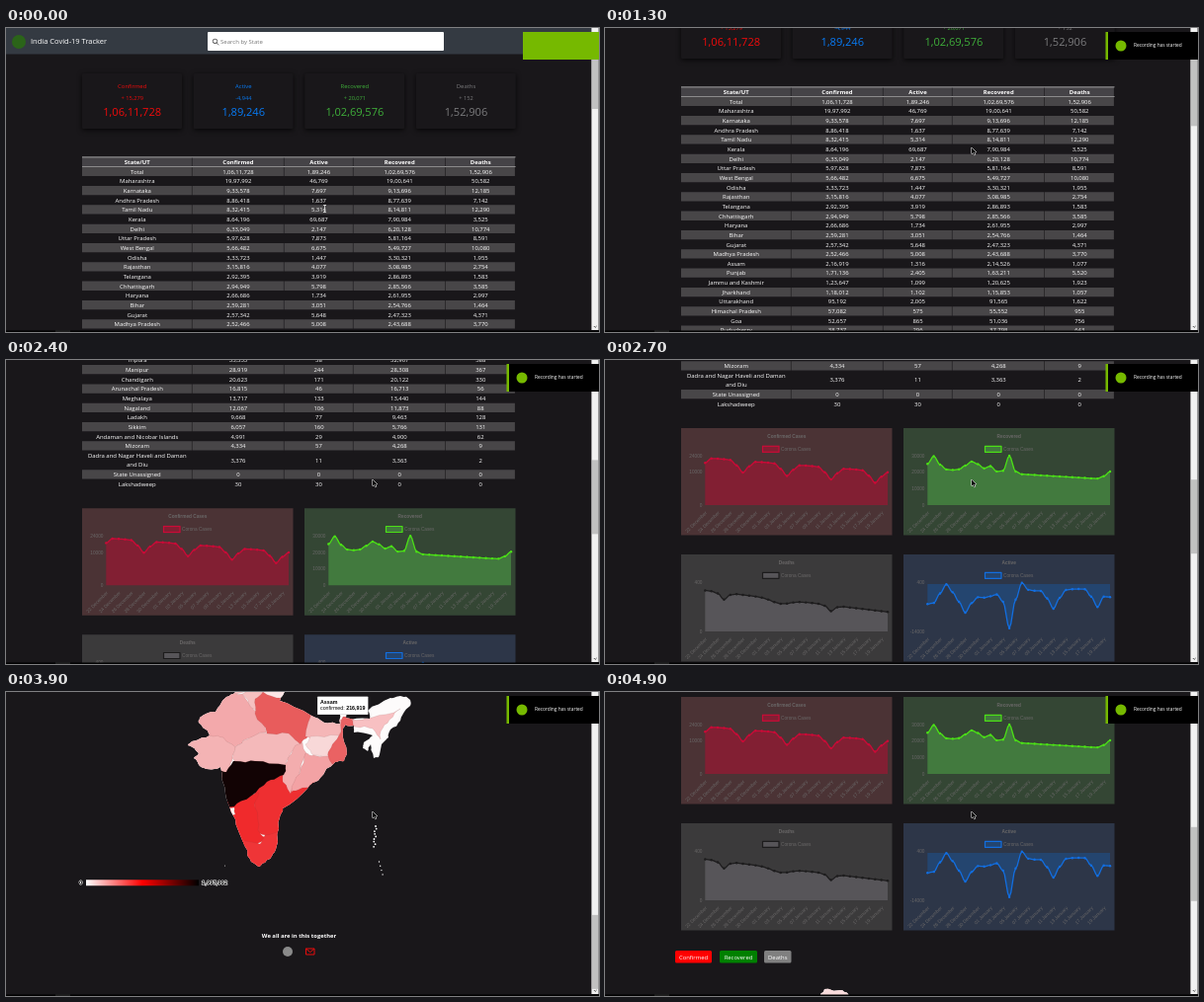
Recreate the animation shown at these times as an HTML page with a canvas. Size 600 by 308 pixels, loop 5000 ms.

```html
<!DOCTYPE html>
<html lang="en">
<head>
<meta charset="utf-8">
<title>Tracker</title>
<style>
html, body { margin: 0; width: 100%; height: 100%; overflow: hidden; background: #19171a; }
canvas { display: block; width: 600px; height: 308px; }
</style>
</head>
<body>
<canvas id="stage"></canvas>
<script>
const stage = document.getElementById('stage');
const dpr = window.devicePixelRatio || 1;
stage.width = 600 * dpr;
stage.height = 308 * dpr;
const c = stage.getContext('2d');
const SANS = '"Open Sans", "Noto Sans", sans-serif';
const ARIAL = '"Liberation Sans", Arial, sans-serif';
const BG = '#19171a';

// Confirmed, recovered, deaths; active is the remainder.
const rows = `Total 10611728 10269576 152906
Maharashtra 1997992 1900641 50582
Karnataka 933578 913696 12185
Andhra Pradesh 886418 877639 7142
Tamil Nadu 832415 814811 12290
Kerala 864196 790984 3525
Delhi 633049 620128 10774
Uttar Pradesh 597628 581164 8591
West Bengal 566482 549727 10080
Odisha 333723 330321 1955
Rajasthan 315816 308985 2754
Telangana 292395 286893 1583
Chhattisgarh 294949 285566 3585
Haryana 266686 261955 2997
Bihar 259281 254766 1464
Gujarat 257342 247323 4371
Madhya Pradesh 252466 243688 3770
Assam 216919 214526 1077
Punjab 171136 163211 5520
Jammu and Kashmir 123647 120625 1923
Jharkhand 118012 115853 1057
Uttarakhand 95192 91565 1622
Himachal Pradesh 57082 55552 955
Goa 52657 51036 756
Puducherry 38737 37798 643
Tripura 33333 32907 388
Manipur 28919 28308 367
Chandigarh 20623 20122 330
Arunachal Pradesh 16815 16713 56
Meghalaya 13717 13440 144
Nagaland 12067 11873 88
Ladakh 9668 9463 128
Sikkim 6057 5766 131
Andaman and Nicobar Islands 4991 4900 62
Mizoram 4334 4268 9
Dadra and Nagar Haveli and Daman/and Diu 3376 3363 2
State Unassigned 0 0 0
Lakshadweep 30 0 0`.split('\n').map(line => {
  const [, name, ...n] = line.match(/^(.+) (\d+) (\d+) (\d+)$/);
  const [conf, rec, dead] = n.map(Number);
  return [name, ...[conf, conf - rec - dead, rec, dead].map(v => v.toLocaleString('en-IN'))];
});

function text(s, x, y, size, color, align = 'center', weight = 400, family = SANS) {
  c.font = `${weight} ${size}px ${family}`;
  c.textAlign = align;
  c.fillStyle = color;
  c.fillText(s, x, y + size * 0.35);
}

function box(x, y, w, h, color, r = 0) {
  c.fillStyle = color;
  c.beginPath();
  c.roundRect(x, y, w, h, r);
  c.fill();
}

function dot(x, y, r, color) {
  c.fillStyle = color;
  c.beginPath();
  c.arc(x, y, r, 0, 7);
  c.fill();
}

// Open polyline through the points of a string like "1,2 3,4".
const pairs = s => s.split(' ').map(p => p.split(',').map(Number));
function line(points, color, width) {
  c.beginPath();
  pairs(points).forEach(p => c.lineTo(...p));
  c.strokeStyle = color;
  c.lineWidth = width;
  c.stroke();
}

function header() {
  box(0, 0, 600, 26.5, '#343a42');
  dot(13, 14, 7, '#2b6419');
  text('India Covid-19 Tracker', 25, 13.3, 7.5, '#fff', 'left');
  box(204, 4, 239, 19, '#fff', 1);
  dot(211.5, 13.3, 2.6, '#555');
  dot(211.5, 13.3, 1.8, '#fff');
  line('213.2,15 215.3,17.3', '#555', 0.8);
  text('Search by State', 217, 14, 6, '#757575', 'left');
}

function cards() {
  const list = [['Confirmed', '+ 15,279', '#f00b0b'], ['Active', '-4,944', '#087bf5'],
    ['Recovered', '+ 20,071', '#3fae3a'], ['Deaths', '+ 152', '#7b7b7d']];
  list.forEach(([name, delta, color], i) => {
    const x = 77 + i * 112.6, mid = x + 50.7;
    c.shadowColor = 'rgba(0,0,0,.75)';
    c.shadowBlur = 5 * dpr;
    c.shadowOffsetY = 1.5 * dpr;
    box(x, 46, 101, 56, BG, 1.5);
    c.shadowColor = 'transparent';
    text(name, mid, 59, 5.9, color);
    text(delta, mid, 71, 5.7, color);
    text(rows[0][i + 1], mid, 85, 11.1, color);
  });
}

function table() {
  const edges = [77, 188.5, 281.5, 351.5, 445, 515.5];
  const row = (cells, y, h, fill, weight) => cells.forEach((s, i) => {
    const w = edges[i + 1] - edges[i], mid = edges[i] + w / 2;
    if (fill) box(edges[i], y, w - 0.6, h - 0.4, fill);
    const parts = i || weight ? [s] : s.split('/');
    parts.forEach((p, k) =>
      text(p, mid, y + h / 2 + (k - (parts.length - 1) / 2) * 9.6, 5.95, '#fff', 'center', weight));
  });
  row(['State/UT', 'Confirmed', 'Active', 'Recovered', 'Deaths'], 131, 9.7, '#454347', 700);
  box(77, 130.6, 438.5, 0.7, '#ccc');
  box(77, 140.2, 438.5, 0.7, '#ccc');
  let y = 140.7;
  rows.forEach((r, i) => {
    const h = r[0].includes('/') ? 19.2 : 9.66;
    row(r, y, h, i % 2 ? '' : '#484648');
    y += h;
  });
}

const days = Array.from({ length: 15 }, (_, i) => {
  const d = 22 + i * 2;
  return d < 31 ? d + ' December' : String(d - 31).padStart(2, '0') + ' January';
});

const bump = (i, at, height, width) => height * Math.exp(-(((i - at) / width) ** 2));
const weekly = i => Math.cos(Math.PI * (i + 1) / 7) ** 8;

// level(day) is the height of the curve, measured down from the top of the panel.
function chart(x, y, title, [back, area, stroke], base, ticks, level) {
  const w = 213.5, left = x + 24.3, step = 6.37;
  const at = i => [left + i * step, y + level(i)];
  const label = (s, tx, ty, align, weight) => text(s, tx, ty, 4.75, '#6a6868', align, weight, ARIAL);
  box(x, y, w, 108.5, back);
  label(title, x + w / 2, y + 8, 'center', 700);
  box(x + 82.5, y + 18.3, 16.5, 6, area);
  c.strokeStyle = stroke;
  c.lineWidth = 1.2;
  c.strokeRect(x + 82.5, y + 18.3, 16.5, 6);
  label('Corona Cases', x + 101, y + 21.4, 'left');
  ticks.forEach((s, i) => label(s, x + 21.5, y + 28 + 50 * i / (ticks.length - 1), 'right'));

  const curve = new Path2D();
  for (let i = 0; i <= 29; i += 0.25) {
    const k = Math.floor(i), f = i - k, s = f * f * (3 - 2 * f);
    curve.lineTo(left + i * step, y + level(k) * (1 - s) + level(k + 1) * s);
  }
  const fill = new Path2D(curve);
  fill.lineTo(left + 29 * step, y + base);
  fill.lineTo(left, y + base);
  c.fillStyle = area;
  c.fill(fill);
  c.lineWidth = 1.3;
  c.lineJoin = 'round';
  c.stroke(curve);
  for (let i = 0; i < 30; i++) dot(...at(i), 1.2, stroke);

  days.forEach((s, i) => {
    c.save();
    c.translate(left + i * step * 2 + 1, y + 85);
    c.rotate(-0.78);
    label(s, 0, 0, 'right');
    c.restore();
  });
}

function charts() {
  chart(77, 537, 'Confirmed Cases', ['#4b3335', '#821f33', '#cb0a37'], 78,
    ['24000', '', '10000', '', '0'].filter((s, i) => i !== 1),
    i => 30 + i * 0.5 + weekly(i) * 12);
  chart(302, 537, 'Recovered', ['#344634', '#427a3e', '#4be016'], 78,
    ['30000', '20000', '10000', '0'],
    i => 41 + i * 0.38 - bump(i, 1, 13, 1) - bump(i, 7.2, 10, 1.5) - bump(i, 10, 6, 0.8)
      - bump(i, 13, 18, 0.7) - bump(i, 29, 8, 1));
  chart(77, 665, 'Deaths', ['#3b3a3b', '#575559', '#1d1c1d'], 78, ['400', '0'],
    i => 36.5 + i * 0.75 + bump(i, 3, 7, 0.8) + bump(i, 12, 4.5, 2) + bump(i, 20, 6, 0.8));
  chart(302, 665, 'Active', ['#2d3648', '#24456f', '#126ee0'], 30, ['400', '-14000'],
    i => 41 - i * 0.25 + weekly(i) * 19 + bump(i, 1, 8, 0.7) - bump(i, 3, 10, 0.8)
      + bump(i, 9, 5, 2) + bump(i, 13, 18, 0.6) - bump(i, 15, 9, 0.7) + bump(i, 29, 9, 0.6));
  [['Confirmed', 71, 37, '#f00'], ['Recovered', 116, 38, '#008000'], ['Deaths', 161, 27.5, '#808080']]
    .forEach(([s, x, w, color]) => {
      box(x, 794, w, 12.5, color, 1.5);
      text(s, x + w / 2, 800.5, 5.9, '#fff');
    });
}

// Bends each edge at its midpoint, twice; the bend depends on the place alone.
function rough(points) {
  const path = new Path2D();
  const edge = ([x, y], [u, v], depth) => {
    const size = Math.min(1.3, Math.hypot(u - x, v - y) * 0.12);
    const mx = (x + u) / 2, my = (y + v) / 2;
    const mid = [mx + Math.sin(mx * 7 + my * 3) * size, my + Math.cos(mx * 5 - my * 4) * size];
    if (depth) {
      edge([x, y], mid, depth - 1);
      edge(mid, [u, v], depth - 1);
    } else path.lineTo(x, y);
  };
  const p = pairs(points);
  p.forEach((a, i) => edge(a, p[(i + 1) % p.length], 2));
  path.closePath();
  return path;
}

// States are loose patches, painted in order and cut by the coast and border.
const country = rough('218,34 222,29 240,30 247,37 277,40 267,56 271,64 270,70 260,70 268,80 284,91 277,102 309,117 322,124 338,125 337,110 343,109 344,119 368,120 366,112 389,99 399,97 409,101 409,107 399,122 389,131 387,139 380,146 377,159 372,160 369,146 366,153 361,150 362,144 371,137 352,134 352,127 343,126 341,133 345,155 342,163 333,164 318,180 309,186 300,196 280,211 277,220 275,245 270,257 262,266 256,270 248,265 242,250 232,222 222,196 217,169 203,171 196,168 190,160 195,155 184,147 188,143 206,137 195,124 196,119 212,113 223,98 232,93 232,77 238,71 226,66 222,58 223,50 218,42');
const states = [
  ['#fadddd', '205,15 290,15 280,70 246,66 240,74 205,75'],
  ['#fdeeee', '243,72 246,65 275,68 266,84 250,86'],
  ['#f7c3c4', '222,70 244,72 251,86 246,94 222,97'],
  ['#fde6e6', '258,84 266,80 292,88 278,108 260,96'],
  ['#f5c0c0', '239,95 251,86 259,85 260,95 256,111 248,110'],
  ['#f3a9ab', '220,94 239,95 258,118 263,134 240,142 232,149 205,138 180,125'],
  ['#f4b3b4', '175,138 206,137 220,139 232,149 229,162 224,180 175,180'],
  ['#f4b9ba', '232,149 240,142 258,134 290,134 300,142 291,151 283,167 236,166 229,160'],
  ['#e85c5c', '260,93 278,99 312,112 304,140 298,146 286,135 264,135 252,115 252,100'],
  ['#f5b6b7', '308,112 345,122 337,139 316,142 303,138'],
  ['#f8d8d8', '303,146 308,138 337,137 328,160 311,157'],
  ['#ee2f31', '256,185 281,174 320,178 290,215 282,240 254,235 250,200'],
  ['#f02a2c', '220,206 256,195 252,210 255,233 262,240 254,248 230,252'],
  ['#ef3537', '230,240 242,244 257,247 262,238 285,234 275,280 245,280'],
  ['#f3adae', '291,150 300,144 304,155 296,178 288,196 280,184 282,167'],
  ['#f3a2a4', '303,155 311,157 338,160 322,186 300,190 289,194 297,176'],
  ['#ea6263', '337,137 341,118 352,118 354,127 345,129 352,168 330,166 326,154'],
  ['#120304', '210,174 223,174 230,163 252,163 283,167 281,177 264,184 247,199 231,209 210,215'],
  ['#fdf3f0', '222,211 231,210 232,217 226,222'],
  ['#f8c0c2', '350,121 370,119 399,110 388,121 379,133 379,141 371,130 352,128'],
].map(([fill, points]) => [fill, rough(points)]);

function map() {
  c.save();
  c.translate(0, 804);
  c.save();
  c.clip(country);
  box(170, 0, 260, 290, '#fdfbfb');
  c.strokeStyle = 'rgba(120,60,65,.3)';
  c.lineWidth = 0.4;
  for (const [fill, path] of states) {
    c.fillStyle = fill;
    c.fill(path);
    c.stroke(path);
  }
  c.restore();
  for (let i = 0; i < 9; i++) dot(374 + Math.sin(i * 2) - i * 0.2, 229 + i * 2.6, 0.9, '#fff');
  for (let i = 0; i < 4; i++) dot(377.5 + i * 1.2, 265 + i * 4.3, 0.7, '#fff');
  dot(221.5, 269, 0.5, '#ddd');

  const grad = c.createLinearGradient(81, 0, 195, 0);
  ['#fff', '#f00', '#000'].forEach((color, i) => grad.addColorStop(i / 2, color));
  box(81, 283.3, 114, 6, grad);
  [['0', 75.5], ['1,997,992', 211]].forEach(([s, x]) => {
    c.font = `700 5.8px ${ARIAL}`;
    c.textAlign = 'center';
    c.strokeStyle = '#fff';
    c.lineWidth = 1.2;
    c.strokeText(s, x, 288.2);
    text(s, x, 286.2, 5.8, '#000', 'center', 700, ARIAL);
  });
  c.restore();
}

function tooltip() {
  box(315, 901.5, 51.5, 18.5, '#ccc', 0.8);
  box(315.5, 902, 50.5, 17.5, '#fff', 0.5);
  text('Assam', 318, 907, 5.3, '#000', 'left', 700, ARIAL);
  text('confirmed: ', 318, 913.6, 5.3, '#000', 'left', 400, ARIAL);
  text('216,919', 318 + c.measureText('confirmed: ').width, 913.6, 5.3, '#000', 'left', 700, ARIAL);
}

function footer() {
  text('We all are in this together', 296.5, 1143.5, 5.85, '#fff', 'center', 700);
  dot(285, 1160, 5, '#8a8a8a');
  line('303.5,1157 312,1157 312,1163 303.5,1163 303.5,1157 307.75,1160.6 312,1157', '#e80c0c', 1);
}

function scrollbar(top) {
  box(592.4, 0, 7.2, 306, '#f1f1f1');
  box(593, 7 + top * 0.244, 6, 75, '#c1c1c1');
  line('594.8,302 596.2,303.4 597.6,302', '#505050', 1);
  box(0, 306.5, 600, 1.5, '#000');
  box(50, 306.6, 15, 1, '#333');
}

function notice(t) {
  const x = ramp(t, [[0, 523], [100, 506.5]]);
  const dark = ramp(t, [[200, 600], [500, 509]]);
  box(x, 4, 600 - x, 28, '#76b900');
  c.save();
  c.beginPath();
  c.rect(dark, 4, 600 - dark, 28);
  c.clip();
  box(509, 4, 91, 28, '#000');
  dot(522, 18, 5.5, '#76b900');
  text('Recording has started', 535, 17.8, 4.8, '#fff', 'left');
  c.restore();
}

function pointer(t) {
  c.save();
  c.translate(ramp(t, [[600, 322.5], [1000, 371]]), ramp(t, [[600, 183], [1000, 121]]));
  if (t < 700) {
    line('-1.5,-3.5 1.5,-3.5 0,-3.5 0,3.5 -1.5,3.5 1.5,3.5', '#ddd', 0.8);
  } else {
    line('0,0 0,6.5 1.5,5.2 2.6,7.7 3.5,7.3 2.5,4.9 4.5,4.7 0,0', '#fff', 1);
    c.fillStyle = '#111';
    c.fill();
  }
  c.restore();
}

// Linear interpolation through [time, value] keys.
function ramp(t, keys) {
  if (t <= keys[0][0]) return keys[0][1];
  for (let i = 1; i < keys.length; i++) {
    const [a, from] = keys[i - 1], [b, to] = keys[i];
    if (t <= b) return from + (to - from) * (t - a) / (b - a);
  }
  return keys[keys.length - 1][1];
}

const scroll = [[1000, 0], [1300, 71], [2000, 278.5], [2700, 468], [3000, 804],
  [3300, 804], [3600, 897], [4300, 897], [4800, 650], [4900, 532]];

function draw(now) {
  const t = Math.floor(now % 5000 / 100) * 100;
  const top = ramp(t, scroll);
  c.setTransform(dpr, 0, 0, dpr, 0, 0);
  box(0, 0, 600, 308, BG);
  c.save();
  c.translate(0, -top);
  header();
  cards();
  table();
  charts();
  map();
  if (t >= 3100 && t < 4400) tooltip();
  footer();
  c.restore();
  scrollbar(top);
  notice(t);
  pointer(t);
}

const start = performance.now();
function tick() {
  draw(performance.now() - start);
  requestAnimationFrame(tick);
}
tick();
</script>
</body>
</html>
```
